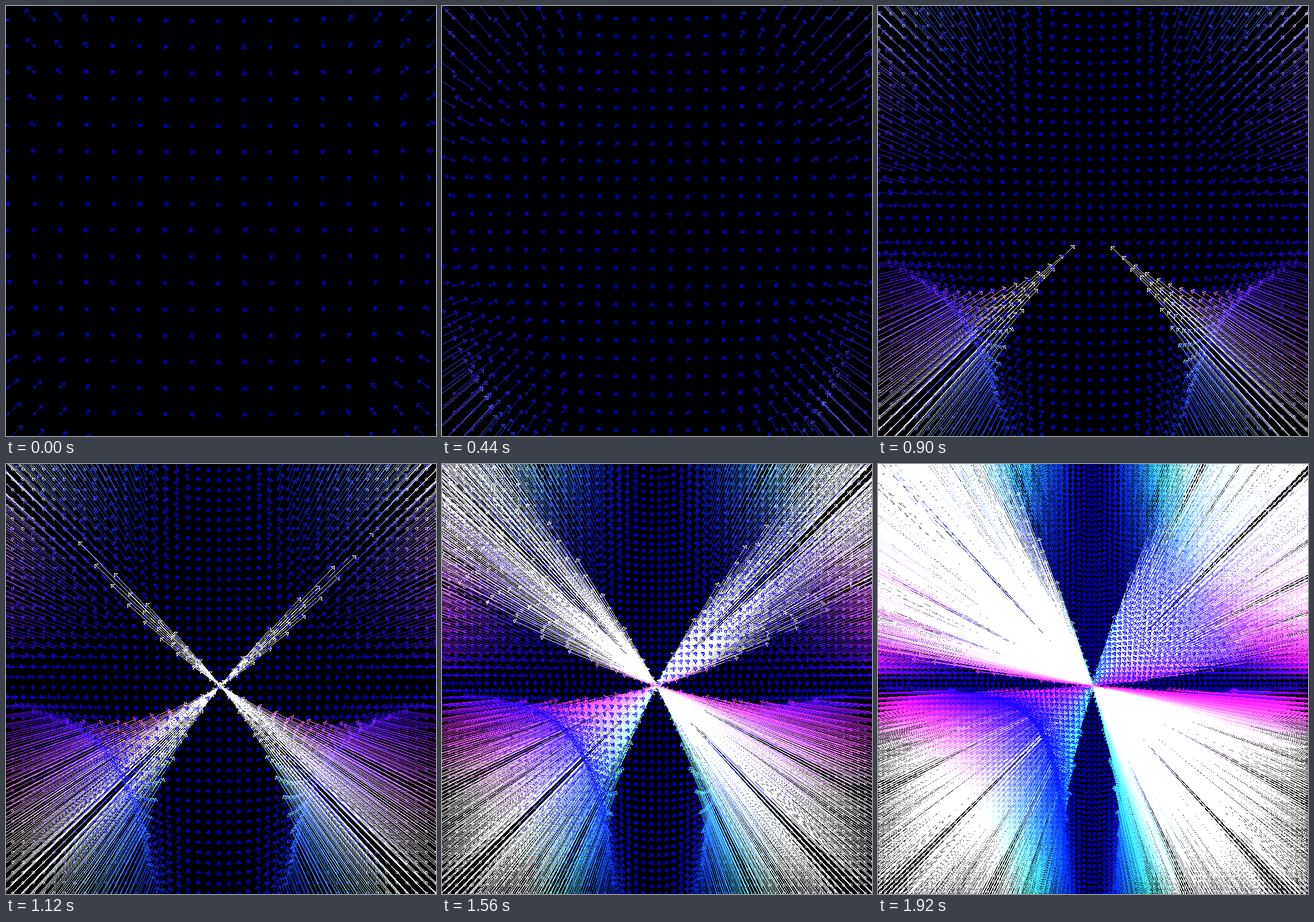
An HTML page with a canvas that plays this animation: 748 px wide and 748 px high, repeating every 2150 ms.

```html
<!DOCTYPE html>
<html lang="en">
<head>
<meta charset="utf-8">
<title>Vector field zoom</title>
<style>
  html, body { margin: 0; width: 100%; height: 100%; overflow: hidden; background: #000; }
  canvas { display: block; }
</style>
</head>
<body>
<canvas id="stage" width="748" height="748"></canvas>
<script>
const SIZE = 748, LOOP = 2150, STEPS = 18;
const ORIGIN_X = 372.5, ORIGIN_Y = 385, HALF_SPAN = 415;
const START_RANGE = 100 / 11, ZOOM = 1.1, ZOOM_LOW = 1.098, ZOOM_HIGH = 1.1025;
const FIELD_SCALE = 8000;
const HEAD = 6;

const ctx = document.getElementById('stage').getContext('2d');
const image = ctx.createImageData(SIZE, SIZE);
const pixels = new Uint32Array(image.data.buffer);
const BLACK = 0xff000000;

function plot(x, y, color) {
  if (x >= 0 && y >= 0 && x < SIZE && y < SIZE) pixels[y * SIZE + x] = color;
}

// Hard-edged line, walked along its longer axis and limited to the stage.
function line(x0, y0, x1, y1, color) {
  x0 = Math.round(x0); y0 = Math.round(y0);
  x1 = Math.round(x1); y1 = Math.round(y1);
  const dx = x1 - x0, dy = y1 - y0;
  const count = Math.max(Math.abs(dx), Math.abs(dy));
  if (!count) return plot(x0, y0, color);
  let from = 0, to = 1;
  for (const [p, d] of [[x0, dx], [y0, dy]]) {
    if (!d) {
      if (p < 0 || p >= SIZE) return;
      continue;
    }
    const a = -p / d, b = (SIZE - 1 - p) / d;
    from = Math.max(from, Math.min(a, b));
    to = Math.min(to, Math.max(a, b));
  }
  if (from > to) return;
  const sx = dx / count, sy = dy / count, last = Math.ceil(to * count);
  for (let i = Math.floor(from * count); i <= last; i++) {
    plot(Math.round(x0 + sx * i), Math.round(y0 + sy * i), color);
  }
}

function ring(x, y, color) {
  x = Math.round(x); y = Math.round(y);
  for (let i = -1; i <= 1; i++) {
    plot(x + i, y - 2, color); plot(x + i, y + 2, color);
    plot(x - 2, y + i, color); plot(x + 2, y + i, color);
  }
}

function arrow(x0, y0, x1, y1, angle, color) {
  const corner = turn => [x1 - HEAD * Math.cos(angle + turn), y1 - HEAD * Math.sin(angle + turn)];
  const [ax, ay] = corner(Math.PI / 4), [bx, by] = corner(-Math.PI / 4);
  ring(x0, y0, color);
  line(x0, y0, x1, y1, color);
  line(x1, y1, ax, ay, color);
  line(x1, y1, bx, by, color);
  line(ax, ay, bx, by, color);
}

// The two ends of an axis widen at slightly different rates but fill equal spans.
function gridLine(range, step) {
  const low = START_RANGE * ZOOM_LOW ** step, high = START_RANGE * ZOOM_HIGH ** step;
  const list = [];
  for (let v = -low; v <= high; v++) list.push(v * range / (v < 0 ? low : high));
  return list;
}

const channel = length => Math.min(255, Math.round(Math.abs(length)));

function draw(step) {
  const range = START_RANGE * ZOOM ** step, unit = HALF_SPAN / range;
  const grid = gridLine(range, step);
  pixels.fill(BLACK);
  for (const x of grid) {
    for (const y of grid) {
      const pull = x * x * y * unit / FIELD_SCALE;
      const dx = pull * x, dy = pull * y;
      const color = (0xffff0000 | channel(dy) << 8 | channel(dx)) >>> 0;
      const px = ORIGIN_X + x * unit, py = ORIGIN_Y - y * unit;
      arrow(px, py, px + dx, py - dy, Math.atan2(-dy, dx), color);
    }
  }
  ctx.putImageData(image, 0, 0);
}

const startOf = step => Math.floor(step * 113 / 20) * 20;

let shown = -1;
const begin = performance.now();

function tick() {
  const time = (performance.now() - begin) % LOOP;
  let step = STEPS - 1;
  while (step > 0 && startOf(step) > time) step--;
  if (step !== shown) draw(shown = step);
  requestAnimationFrame(tick);
}
tick();
</script>
</body>
</html>
```
